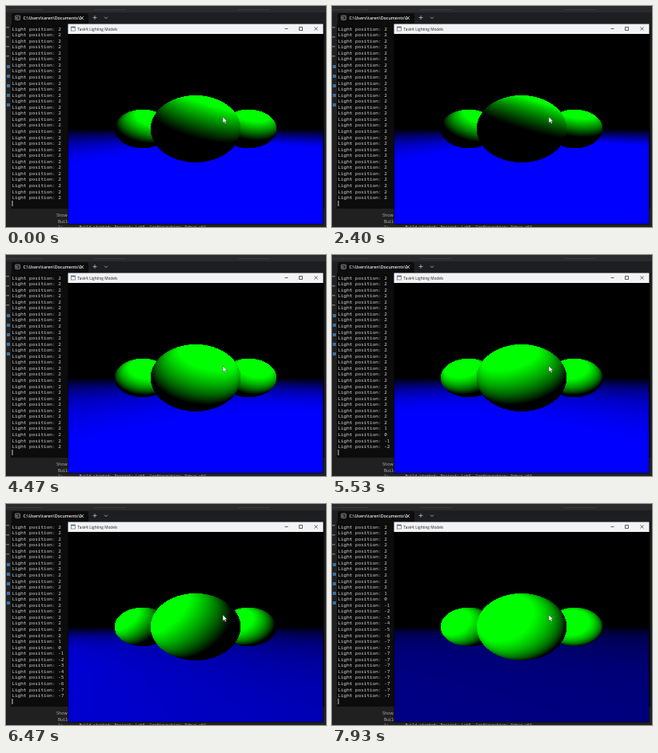
Recreate the animation shown at these times as an HTML page with a canvas. Size 400 px wide and 277 px high, loop 8000 ms.

```html
<!DOCTYPE html>
<html lang="en">
<head>
<meta charset="utf-8">
<title>Lighting models</title>
<style>
  html, body { margin: 0; width: 100%; height: 100%; overflow: hidden; background: #1f1f1f; }
  svg, canvas { position: absolute; left: 0; top: 0; display: block; }
  canvas { left: 78px; top: 35px; }
  .mono { font-family: "Noto Sans Mono", "DejaVu Sans Mono", monospace; white-space: pre; }
  .ui { font-family: "Open Sans", "Noto Sans", sans-serif; }
</style>
</head>
<body>
<svg width="400" height="277" viewBox="0 0 400 277">
  <rect width="400" height="277" fill="#202021"/>
  <rect width="400" height="8" fill="#2b2b2d"/>
  <path d="M0 4.5H46M110 4.5H150M290 4.5H330" stroke="#3a3a3d" stroke-width="1"/>
  <g id="side"></g>

  <!-- terminal -->
  <rect x="6" y="8" width="392" height="246" fill="#0c0c0c"/>
  <rect x="6" y="8" width="392" height="14.5" fill="#1d1e21"/>
  <path d="M7 22.5V12q0-3 3-3h90q3 0 3 3v10.500z" fill="#0c0c0c"/>
  <rect x="11.500" y="12" width="6" height="5.500" rx="1" fill="#333" stroke="#aaa" stroke-width=".6"/>
  <path d="M13 14l1 1-1 1" fill="none" stroke="#ddd" stroke-width=".6"/>
  <text class="ui" x="21.500" y="17" font-size="5.300" font-weight="600" fill="#f0f0f0">C:\Users\taren\Documents\L</text>
  <path d="M93 13l4 4m0-4l-4 4" stroke="#ddd" stroke-width=".8"/>
  <path d="M108.500 14.500h5m-2.500-2.500v5M123 13.700l2 2 2-2" fill="none" stroke="#bbb" stroke-width=".8"/>
  <g id="log" class="mono" font-size="6.030" fill="#d4d4d4"></g>
  <rect x="7.500" y="244" width=".9" height="7" fill="#e0e0e0"/>

  <!-- build output -->
  <g class="ui" font-size="5.400" fill="#b4b4b4">
    <text x="63" y="264">Show output from:</text>
    <text x="65" y="272" class="mono" font-size="5">Build</text>
    <text x="65" y="278.500" class="mono" font-size="4.900">1&gt;------ Build started: Project: Lab5, Configuration: Debug x64 ------</text>
  </g>

  <!-- render window -->
  <rect x="77.500" y="22" width="319" height="251.500" fill="#000"/>
  <rect x="77.500" y="22.500" width="319" height="12.500" fill="#f3f3f5"/>
  <rect x="81.500" y="26" width="5" height="5" fill="#fff" stroke="#555" stroke-width=".6"/>
  <rect x="81.500" y="26" width="5" height="1.500" fill="#3c78b4"/>
  <text class="ui" x="89.500" y="30.500" font-size="4.750" fill="#222">Task4: Lighting Models</text>
  <path d="M348.500 28.500h4M366.500 26.500h4v4h-4zM385.500 26.500l4 4m0-4l-4 4" fill="none" stroke="#222" stroke-width=".7"/>
</svg>
<canvas id="view" width="318" height="238"></canvas>
<svg width="400" height="277" viewBox="0 0 400 277">
  <path d="M271 139v7.500l1.800-1.600 1.200 2.700 1.300-.6-1.200-2.600h2.400z" fill="#fff" stroke="#222" stroke-width=".4"/>
</svg>
<script>
const LOOP = 8000, ROWS = 29, W = 318, H = 238;
const GAIN = 1.28, LIGHT_Y = 5, FLOOR_Y = -1, CAM_Z = 3;
const START = { x: 2, z: 2 };
const BALLS = [[0, 0], [-2, -2], [2, -2]];   // centre x and z, radius 1

// Key presses: each moves the light and prints its x.
const burst = (from, gap, count, dx, dz) =>
  Array.from({ length: count }, (_, i) => ({ at: from + i * gap, dx, dz }));
const presses = [
  ...burst(2300, 170, 5, 0, -1),
  ...burst(3350, 150, 8, 0, 1),
  ...burst(4900, 170, 9, -1, 0),
  ...burst(6430, 170, 10, 0, 1)
];

const svgNode = (tag, attrs, parent) => {
  const node = document.createElementNS('http://www.w3.org/2000/svg', tag);
  for (const key in attrs) node.setAttribute(key, attrs[key]);
  return parent.appendChild(node);
};

const side = document.getElementById('side');
for (let y = 26; y < 132; y += 12) {
  const blue = y > 70;
  svgNode('rect', { x: blue ? 1 : 0, y, width: 4, height: blue ? 4 : 1.5, fill: blue ? '#3d6f9e' : '#6a6a6c' }, side);
}

const log = document.getElementById('log');
const rows = Array.from({ length: ROWS }, (_, i) =>
  svgNode('text', { x: 7.4, y: (30.6 + i * 7.555).toFixed(2) }, log));

const ctx = document.getElementById('view').getContext('2d');
const img = ctx.createImageData(W, H);

// First hit of the ray (dx, dy, -1) from the camera with a ball.
function hitBall(dx, dy, [cx, cz]) {
  const depth = CAM_Z - cz;
  const a = dx * dx + dy * dy + 1;
  const b = dx * cx + depth;
  const d = b * b - a * (cx * cx + depth * depth - 1);
  return d < 0 ? Infinity : (b - Math.sqrt(d)) / a;
}

// The geometry is fixed, so trace it once.
const points = [];
for (let j = 0; j < H; j++) {
  for (let i = 0; i < W; i++) {
    const dx = (i + 0.5 - W / 2) / (W / 2);
    const dy = (H / 2 - j - 0.5) / (H / 2);
    let t = Infinity, ball = null;
    for (const b of BALLS) {
      const hit = hitBall(dx, dy, b);
      if (hit < t) { t = hit; ball = b; }
    }
    if (!ball && dy < 0) t = FLOOR_Y / dy;
    const p = (j * W + i) * 4;
    img.data[p + 3] = 255;
    if (t === Infinity) continue;
    const x = dx * t, y = dy * t, z = CAM_Z - t;
    points.push({ x, y, z, p: p + (ball ? 1 : 2),
      n: ball ? [x - ball[0], y, z - ball[1]] : [0, 1, 0] });
  }
}

function shade(light) {
  for (const { x, y, z, n, p } of points) {
    const lx = light.x - x, ly = LIGHT_Y - y, lz = light.z - z;
    const cos = (n[0] * lx + n[1] * ly + n[2] * lz) / Math.hypot(lx, ly, lz);
    img.data[p] = 255 * Math.max(0, cos) * GAIN;
  }
  ctx.putImageData(img, 0, 0);
}

let shown = -1;
function draw(t) {
  const done = presses.filter(k => k.at <= t);
  if (done.length === shown) return;
  shown = done.length;
  const light = { ...START };
  const printed = Array(ROWS).fill(START.x);
  for (const k of done) {
    light.x += k.dx;
    light.z += k.dz;
    printed.push(light.x);
  }
  printed.slice(-ROWS).forEach((x, i) => { rows[i].textContent = 'Light position: ' + x; });
  shade(light);
}

const t0 = performance.now();
function tick() {
  draw((performance.now() - t0) % LOOP);
  requestAnimationFrame(tick);
}
tick();
</script>
</body>
</html>
```
